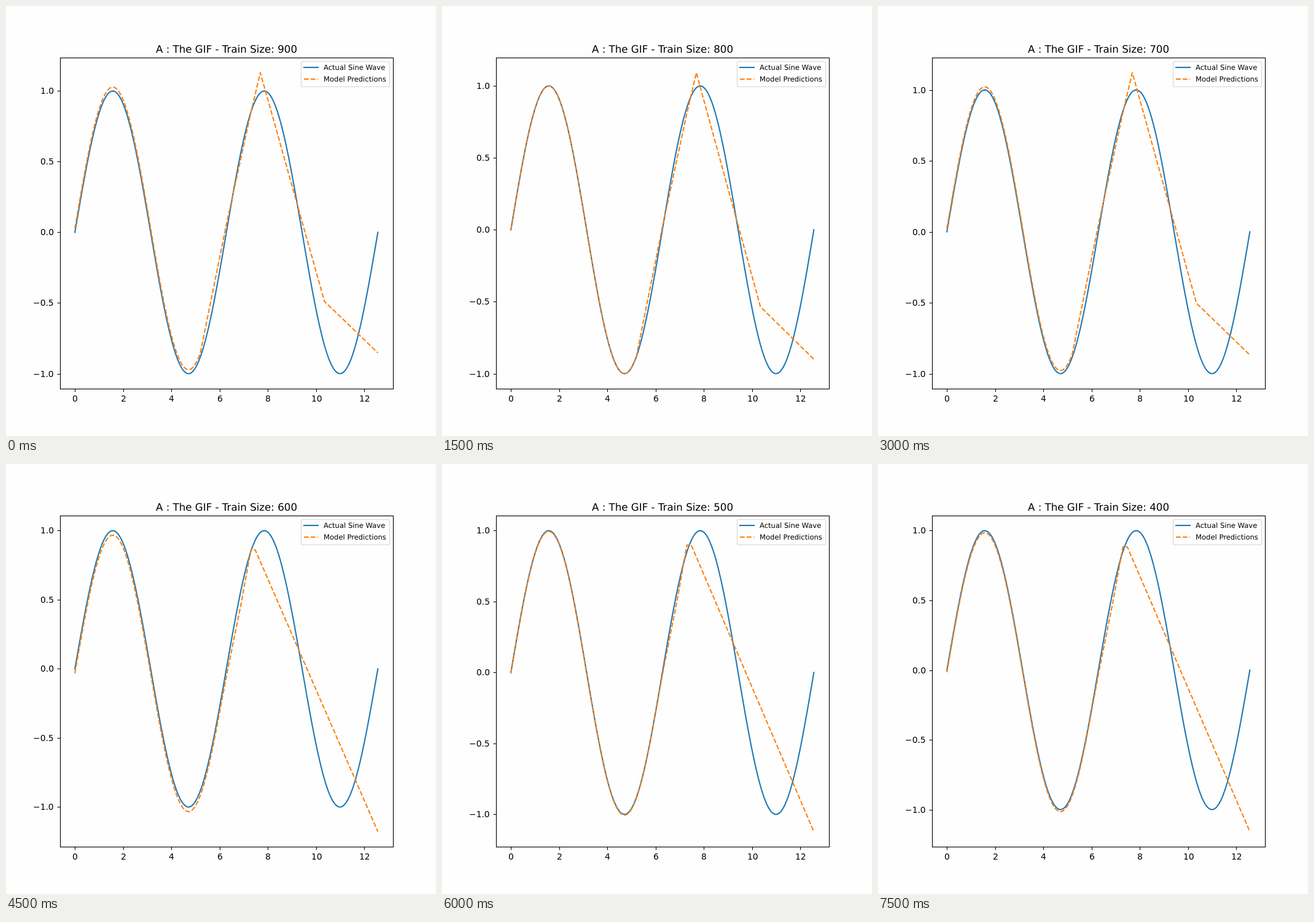
Animation of 700x700 px, one loop 8 s. Source, as an HTML page with a canvas:

```html
<!DOCTYPE html>
<html lang="en">
<head>
<meta charset="utf-8">
<title>Sine wave predictions</title>
<style>
  html, body { margin: 0; width: 100%; height: 100%; overflow: hidden; background: #fefefe; }
  canvas { display: block; }
</style>
</head>
<body>
<canvas id="chart" width="700" height="700"></canvas>
<script>
const ctx = document.getElementById('chart').getContext('2d');
const LOOP = 8000, STEP = 1500;
const BOX = { left: 88.5, top: 84.5, right: 630.5, bottom: 623.5 };
const END = 4 * Math.PI;
const CREST = .99999; // highest sampled value of the sine
const BLUE = '#1f77b4', ORANGE = '#ff7f0e';
const DASH = [7.71, 3.33];

// A fit follows the sine up to `bend`, then runs straight through `knots` to its end.
const SPIKE = { bend: 5.2, knots: end => [[6.28, .015], [7.3, .81], [7.69, 1.092], [10.35, end + .365]] };
const PLATEAU = { bend: 5.9, knots: () => [[6.3, .005], [6.9, .52], [7.3, .905], [7.48, .905]] };
const fits = [
  { ...SPIKE, offset: .028, end: -.891 },
  { ...SPIKE, offset: 0, end: -.9 },
  { ...SPIKE, offset: .022, end: -.898 },
  { ...PLATEAU, offset: -.033, end: -1.1335 },
  { ...PLATEAU, offset: -.005, end: -1.1148 },
  { ...PLATEAU, offset: -.015, end: -1.1378 }
];

function wave(end, offset = 0) {
  const count = Math.ceil(end * 16);
  return Array.from({ length: count + 1 }, (_, i) => {
    const x = end * i / count;
    return [x, Math.sin(x) + offset];
  });
}

function prediction({ bend, knots, offset, end }) {
  const drift = offset * 1.35;
  const straight = [...knots(end), [END, end]].map(([x, y]) => [x, y + drift]);
  return [...wave(bend, offset), ...straight];
}

function line(points, color, width, dash = [], cap = 'butt') {
  ctx.beginPath();
  for (const [x, y] of points) ctx.lineTo(x, y);
  ctx.strokeStyle = color;
  ctx.lineWidth = width;
  ctx.lineCap = cap;
  ctx.lineJoin = 'round';
  ctx.setLineDash(dash);
  ctx.stroke();
}

function label(text, x, y, size, align = 'left') {
  ctx.font = `${size}px "DejaVu Sans", sans-serif`;
  ctx.textRendering = align === 'left' ? 'geometricPrecision' : 'auto';
  ctx.textAlign = 'left';
  ctx.fillStyle = '#000';
  const { width, actualBoundingBoxLeft, actualBoundingBoxRight } = ctx.measureText(text);
  const ink = actualBoundingBoxLeft + actualBoundingBoxRight;
  const shift = { left: 0, center: ink / 2, right: width }[align];
  ctx.fillText(text, Math.round(x - shift), y);
}

function drawLegend() {
  ctx.beginPath();
  ctx.roundRect(480.5, 90.5, 144, 41, 2.3);
  ctx.fillStyle = '#fff';
  ctx.fill();
  ctx.setLineDash([]);
  ctx.strokeStyle = '#d6d6d6';
  ctx.lineWidth = 1.1;
  ctx.stroke();
  line([[485, 100], [508, 100]], BLUE, 2.08, [], 'square');
  line([[485, 119], [508, 119]], ORANGE, 2.08, DASH);
  label('Actual Sine Wave', 517, 104, 11.574);
  label('Model Predictions', 517, 123, 11.574);
}

function draw(index) {
  const predicted = prediction(fits[index]);
  const values = predicted.map(point => point[1]);
  const high = Math.max(CREST, ...values), low = Math.min(-CREST, ...values);
  const scale = 490 / (high - low);
  const toX = x => 112.16 + x * 493.18 / END;
  const toY = y => 108.5 + (high - y) * scale;
  const plot = points => points.map(([x, y]) => [toX(x), toY(y)]);

  ctx.fillStyle = '#fefefe';
  ctx.fillRect(0, 0, 700, 700);

  for (let x = 0; x <= 12; x += 2) {
    const px = Math.round(toX(x)) + .5;
    line([[px, BOX.bottom], [px, BOX.bottom + 4.86]], '#000', 1.11);
    label(x, toX(x), 644, 13.89, 'center');
  }
  for (let y = -1; y <= 1; y += .5) {
    const py = Math.round(toY(y)) + .5;
    line([[BOX.left, py], [BOX.left - 4.86, py]], '#000', 1.11);
    label(y.toFixed(1).replace('-', '\u2212'), 77.8, Math.round(toY(y)) + 5, 13.89, 'right');
  }

  line(plot(wave(END)), BLUE, 2.08, [], 'square');
  line(plot(predicted), ORANGE, 2.08, DASH);

  ctx.setLineDash([]);
  ctx.strokeStyle = '#000';
  ctx.lineWidth = 1.11;
  ctx.lineJoin = 'miter';
  ctx.strokeRect(BOX.left, BOX.top, BOX.right - BOX.left, BOX.bottom - BOX.top);
  label(`A : The GIF - Train Size: ${900 - 100 * index}`, 244, 76, 16.667);
  drawLegend();
}

const start = performance.now();
function tick() {
  const time = (performance.now() - start) % LOOP;
  draw(Math.floor(time / STEP));
  requestAnimationFrame(tick);
}
tick();
</script>
</body>
</html>
```
